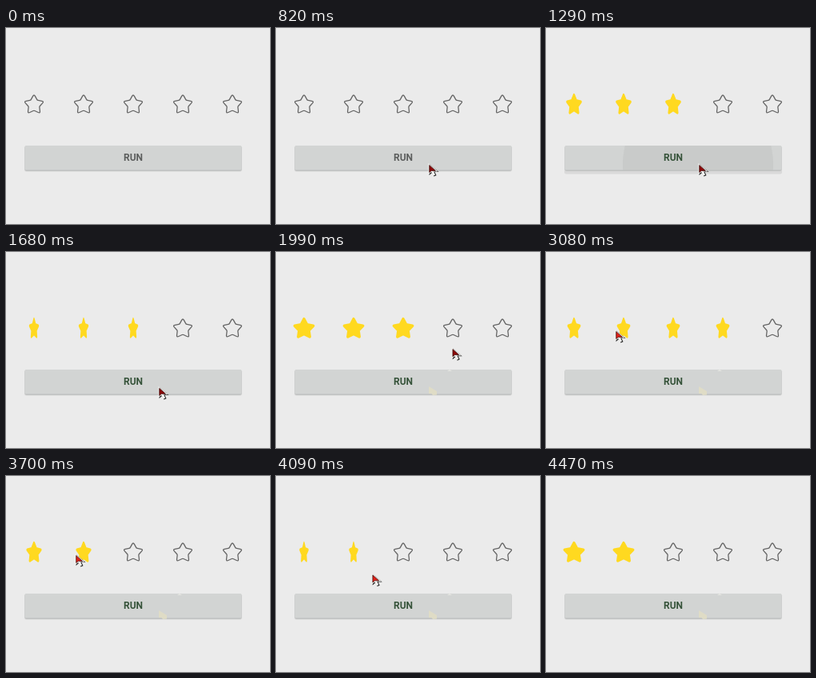
An HTML page for the animation above (5.26 s loop, 330 by 245 pixels).

```html
<!DOCTYPE html>
<html lang="en">
<head>
<meta charset="utf-8">
<title>Star rating</title>
<style>
html, body { margin: 0; width: 100%; height: 100%; overflow: hidden; background: #ebebeb; }
svg { display: block; width: 330px; height: 245px; }
text { font: 600 12px Roboto, sans-serif; text-anchor: middle; }
.outline { fill: none; stroke: #646464; stroke-width: 1.3; }
.gold { fill: #ffd920; stroke: #ffd920; stroke-width: 3.5; stroke-linejoin: round; }
</style>
</head>
<body>
<svg viewBox="0 0 330 245">
  <clipPath id="face"><rect x="23.5" y="147" width="271" height="30.5" rx="1.5"/></clipPath>
  <g id="stars"></g>
  <rect id="shadow" x="23" y="147.5" width="272" height="32" rx="2" fill="#000" opacity=".08"/>
  <rect x="23.5" y="148" width="271" height="30.7" rx="2" fill="#bcbebd"/>
  <rect x="23.5" y="147" width="271" height="30.5" rx="1.5" fill="#d2d4d3"/>
  <circle id="ripple" cx="190" cy="170" clip-path="url(#face)"/>
  <text id="label" x="159" y="166.3">RUN</text>
  <path id="smudge" d="M191 168L201 174V178.5L196 179L194.5 177H191Z" fill="#dfdcc6"/>
  <path id="speck" d="M214 149L217 147L220 149Z" fill="#e6e6e2"/>
  <g id="cursor">
    <path d="M1 1V15L4.5 12L7 16.5L10 15.2L8 11H13Z" fill="#222"/>
    <path d="M0 0V14L3.8 11L6 15.8L8.6 14.6L6.6 10.4H12Z" fill="#f7f7f4"/>
    <path d="M1.2 2.4V11.6L3.8 9.4H9Z" id="tip" stroke="#2a0808" stroke-width=".7"/>
  </g>
</svg>
<script>
const LOOP = 5260, STEP = 77.64, FIRST = 200, FLIP = 1000;
const $ = id => document.getElementById(id);
const clamp = v => Math.min(1, Math.max(0, v));
const ease = p => 0.5 - Math.cos(Math.PI * p) / 2;

// time, number of gold stars
const ratings = [[0, 0], [1050, 3], [2520, 4], [3530, 2]];
const flips = [1062, 2480, 3465];

// time, x, y of the pointer
const pointer = [
  [200, 229, 233], [666, 190, 175], [743, 190, 172], [821, 190.5, 169],
  [1597, 190.5, 169], [1675, 190.5, 168], [2063, 227, 107], [2141, 227.5, 105],
  [2218, 228, 103], [2529, 228, 103], [2995, 88, 97.5], [3072, 86.5, 97],
  [4004, 86.5, 97], [4393, 252, 219]
];

function starPoints(outer, inner) {
  return Array.from({ length: 10 }, (_, i) => {
    const angle = i * Math.PI / 5, r = i % 2 ? inner : outer;
    return [r * Math.sin(angle), -r * Math.cos(angle)];
  });
}

function roundedStar(outer, inner) {
  const points = starPoints(outer, inner);
  const toward = (a, b, k) => a.map((v, i) => (v + (b[i] - v) * k).toFixed(2)).join(" ");
  return points.map((p, i) => {
    const cut = i % 2 ? 0.12 : 0.32;
    const before = points[(i + 9) % 10], after = points[(i + 1) % 10];
    return `${i ? "L" : "M"}${toward(p, before, cut)}Q${p.join(" ")} ${toward(p, after, cut)}`;
  }).join("") + "Z";
}

function add(parent, name, attributes) {
  const node = document.createElementNS("http://www.w3.org/2000/svg", name);
  for (const key in attributes) node.setAttribute(key, attributes[key]);
  return parent.appendChild(node);
}

const stars = Array.from({ length: 5 }, (_, i) => {
  const place = add($("stars"), "g", { transform: `translate(${35 + i * 62} 96)` });
  return {
    outline: add(place, "path", { class: "outline", d: roundedStar(13.2, 7.1) }),
    gold: add(place, "path", { class: "gold", d: `M${starPoints(12.3, 6.4).join("L")}Z` })
  };
});

function pointerAt(t) {
  const next = pointer.findIndex(key => key[0] > t);
  if (next < 1) return pointer[next ? pointer.length - 1 : 0].slice(1);
  const a = pointer[next - 1], b = pointer[next];
  const p = (t - a[0]) / (b[0] - a[0]);
  return [1, 2].map(i => a[i] + (b[i] - a[i]) * p);
}

const show = (node, visible) => node.setAttribute("visibility", visible ? "visible" : "hidden");

function draw(t) {
  const rating = ratings.filter(key => key[0] <= t).pop()[1];
  const start = flips.filter(time => time <= t).pop() ?? -FLIP;
  const turn = Math.abs(Math.cos(2 * Math.PI * ease(clamp((t - start) / FLIP))));
  stars.forEach((star, i) => {
    show(star.outline, i >= rating);
    show(star.gold, i < rating);
    star.gold.setAttribute("transform", `scale(${turn.toFixed(4)} 1)`);
  });

  const press = clamp((t - 1040) / 480);
  $("ripple").setAttribute("r", 180 * ease(press));
  $("ripple").setAttribute("opacity", 0.09 * (1 - press));
  $("shadow").setAttribute("height", 32 + 3 * Math.sin(Math.PI * press));
  $("label").setAttribute("fill", t < 1050 ? "#5c5e5d" : "#36533a");
  show($("smudge"), t > 1740);
  show($("speck"), t > 1900);

  show($("cursor"), t >= FIRST && t < 4460);
  $("cursor").setAttribute("transform", `translate(${pointerAt(t)})`);
  $("tip").setAttribute("fill", t < 2600 ? "#8c0a0a" : "#df2018");
}

const began = performance.now();
function tick() {
  const t = (performance.now() - began) % LOOP;
  const step = Math.floor((t - FIRST + 5) / STEP);
  draw(step < 0 ? 0 : FIRST + step * STEP);
  requestAnimationFrame(tick);
}
tick();
</script>
</body>
</html>
```
